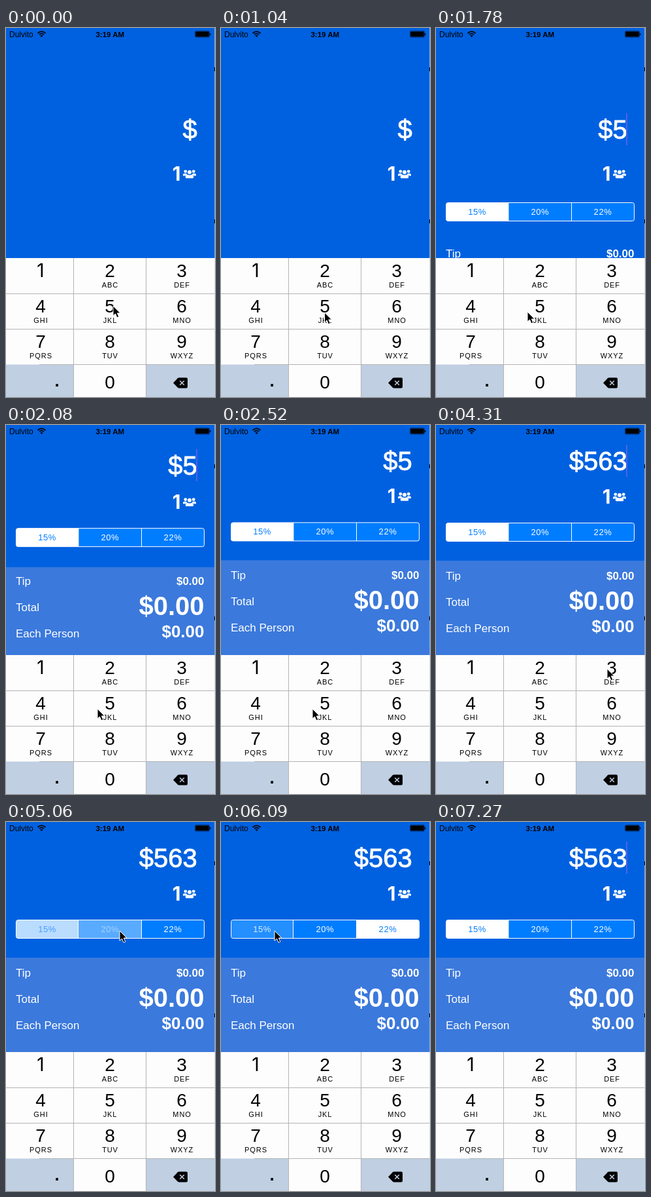
An HTML page for the animation above (7570 ms loop, 320 by 563 pixels).

```html
<!DOCTYPE html>
<html lang="en">
<head>
<meta charset="utf-8">
<title>Tip calculator</title>
<style>
  html, body { margin: 0; width: 100%; height: 100%; overflow: hidden; background: #0061e0; }
  svg { display: block; width: 100vw; height: 100vh; font-family: "Liberation Sans", Arial, sans-serif; }
  .white { fill: #fff; }
  .bold { font-weight: bold; }
  .mid { text-anchor: middle; }
  .end { text-anchor: end; }
  .one { font-family: Inter, sans-serif; }
</style>
</head>
<body>
<svg id="stage" viewBox="0 0 320 563" preserveAspectRatio="none"></svg>
<script>
const LOOP = 7570, TICKS = 51, TICK = LOOP / TICKS;
const NS = 'http://www.w3.org/2000/svg';
const stage = document.getElementById('stage');

function add(parent, tag, attrs = {}, text) {
  const el = document.createElementNS(NS, tag);
  for (const key in attrs) el.setAttribute(key, attrs[key]);
  if (text !== undefined) el.textContent = text;
  return parent.appendChild(el);
}
const rect = (parent, x, y, width, height, fill, more) =>
  add(parent, 'rect', { x, y, width, height, fill, ...more });
const label = (parent, x, y, size, text, cls = '', more) =>
  add(parent, 'text', { x, y, 'font-size': size, class: cls, ...more }, text);
const path = (parent, d, more) => add(parent, 'path', { d, ...more });

// Background and sliding panel
rect(stage, 0, 0, 320, 563, '#0061e0');
const panel = rect(stage, 0, 207, 319, 360, '#3b79dc');

// Bill amount with caret
const bill = add(stage, 'g');
const amount = label(bill, 292.8, 69, 40, '$', 'white end', { stroke: '#fff', 'stroke-width': 0.9 });
const caret = rect(bill, 291, 30, 2, 49, '#4f63ea');

// Number of people
const people = add(stage, 'g');
label(people, 267.5, 120, 29.5, '1', 'white end one', { 'font-weight': 700 });
const crowd = add(people, 'g', { class: 'white' });
for (const [x, y, r] of [[274.8, 105.8, 2.4], [287.2, 105.8, 2.4], [281, 107, 3]])
  add(crowd, 'circle', { cx: x, cy: y, r });
path(crowd, 'M271 112.5v-1.5q0-2 2-2h3.2q.6 1 1.200 1.600q-1.800.5-2.400 1.900z');
path(crowd, 'M291 112.5v-1.5q0-2-2-2h-3.2q-.6 1-1.200 1.600q1.800.5 2.400 1.900z');
path(crowd, 'M274.800 114.700q0-3.900 3.200-3.900q3 1.500 6 0q3.200 0 3.200 3.900q0 1.500-1.600 1.500h-9.200q-1.600 0-1.600-1.500z');

// Tip percentages
const picker = add(stage, 'g');
const segments = ['15%', '20%', '22%'].map((text, i) => {
  const x = 15.5 + i * 96.2, right = x + 96.1;
  const d = i === 0 ? `M${right} 149.5H18.5q-3 0-3 3v22q0 3 3 3H${right}z`
    : i === 2 ? `M${x} 149.5H300.5q3 0 3 3v22q0 3-3 3H${x}z`
    : `M${x} 149.5H${right}v28H${x}z`;
  return {
    box: path(picker, d),
    text: label(picker, x + 47.6, 168, 13, text, 'mid', { 'letter-spacing': 0.6 })
  };
});
rect(picker, 15.5, 149.5, 288, 28, 'none', { rx: 3, stroke: '#fff' });
path(picker, 'M110.5 149.5v28M207.5 149.5v28', { stroke: '#fff' });

// Results
const results = add(stage, 'g');
[['Tip', 236, 17, 236], ['Total', 276, 40, 282], ['Each Person', 316, 26, 316]]
  .forEach(([name, y, size, base]) => {
    label(results, 15, y, 17, name, 'white');
    label(results, 303.5, base, size, '$0.00', 'white bold end');
  });

// Keypad
const TINT = '#c0cfe2', LINE = '#b4b4b7';
rect(stage, 0, 351, 320, 212, '#fdfdfd');
const pressedKey = rect(stage, 215, 351, 104, 54, TINT);
rect(stage, 0, 513.5, 103.5, 50, TINT);
rect(stage, 214.5, 513.5, 105.5, 50, TINT);
path(stage, 'M0 405.5H320M0 459.5H320M51 513.5H320M103.5 351V563M214.5 351V563', { stroke: LINE });
const columns = [53, 159, 269];
['', 'ABC', 'DEF', 'GHI', 'JKL', 'MNO', 'PQRS', 'TUV', 'WXYZ'].forEach((letters, i) => {
  const x = columns[i % 3], y = 380.3 + Math.floor(i / 3) * 54;
  label(stage, x, y, 28, i + 1, i ? 'mid' : 'mid one');
  label(stage, x + 0.5, y + 15.7, 11, letters, 'mid', { 'letter-spacing': 0.9 });
});
label(stage, 159, 550.3, 28, '0', 'mid');
label(stage, 78, 547, 26, '.', 'mid bold');
path(stage, 'M256 541.5l7-7.2q.8-.8 2-.8h11q2 0 2 2v12q0 2-2 2h-11q-1.200 0-2-.8z');
path(stage, 'M266.2 538.2l6.6 6.6m0-6.6l-6.6 6.6', { stroke: TINT, 'stroke-width': 1.5 });

// Status bar
label(stage, 5, 13.5, 12, 'Dulvito');
label(stage, 159.3, 13.5, 11.5, '3:19 AM', 'mid bold');
for (const [r, y] of [[6, 8], [3.6, 10.2]])
  path(stage, `M${54.5 - r} ${y}q${r}-${r * 0.85} ${r * 2} 0`, { fill: 'none', stroke: '#000', 'stroke-width': 1.7 });
path(stage, 'M52.3 11.8q2.200-1.600 4.400 0l-2.200 2.200z');
rect(stage, 289.6, 4.8, 21.8, 9.2, 'none', { rx: 1.5, stroke: '#000', 'stroke-width': 0.6 });
rect(stage, 290.3, 5.5, 20.4, 7.8, '#000', { rx: 0.8 });
rect(stage, 311.9, 8, 1.3, 3, '#000', { rx: 0.6 });

// Sliver of the desktop at the right edge
rect(stage, 319, 0, 1, 563, '#c9dcf4', { opacity: 0.6 });
for (const y of [60, 292]) rect(stage, 319, y, 1, 6, '#000');

// Mouse pointer with its tip at the origin
const pointer = path(stage, 'M0 0V15.2L3.5 12L6 17.8L8.8 16.6L6.3 11H11z',
  { stroke: '#fff', 'stroke-width': 1, 'stroke-linejoin': 'round' });

// Tick, x, y
const route = [
  [0, 164, 424], [6, 164, 424], [8, 153, 444], [10, 140, 433], [17, 140, 433],
  [19, 171, 432], [23, 246, 430], [26, 246, 430], [28, 262, 372], [29, 262, 372],
  [32, 176, 172], [33, 174, 166], [34, 174, 166], [36, 250, 168], [39, 250, 168],
  [41, 82, 166], [42, 82, 166], [44, 212, 416], [45, 212, 416], [49, 226, 570], [51, 226, 570]
];
const caretShown = [[3, 5], [9, 14], [19, 25], [27, 31], [35, 38], [42, 45], [49, 50]];

function pointerAt(n) {
  const i = Math.max(1, route.findIndex(stop => stop[0] >= n));
  const [n0, x0, y0] = route[i - 1], [n1, x1, y1] = route[i];
  const k = (n - n0) / (n1 - n0);
  return [x0 + (x1 - x0) * k, y0 + (y1 - y0) * k];
}

// Selected weight of each tip segment
function selection(n) {
  if (n < 34) return [1, 0, 0];
  if (n === 34) return [0.73, 0.35, 0];
  if (n < 38) return [0, 1, 0];
  if (n === 38) return [0, 0.73, 0.35];
  if (n < 41) return [0, 0, 1];
  if (n === 41) return [0.14, 0, 1];
  return [1, 0, 0];
}

// White at weight 1, blue at weight 0
const blend = w => `rgb(${Math.round(255 * w)},${Math.round(125 + 130 * w)},255)`;

function spring(s) {
  if (s <= 0) return 0;
  const rate = 6.7;
  return 1 - Math.exp(-rate * s) * (Math.cos(rate * s) + Math.sin(rate * s));
}

const show = (el, on) => el.setAttribute('visibility', on ? 'visible' : 'hidden');
const shift = (el, y) => el.setAttribute('transform', `translate(0 ${y})`);

function render(ms) {
  const n = Math.min(TICKS - 1, Math.floor((ms % LOOP + 5) / TICK));
  const rest = 1 - spring((n - 12) * TICK / 1000);

  shift(bill, 100 * rest);
  shift(people, 113 * rest);
  shift(picker, 117 * rest);
  shift(results, 114 * rest);
  shift(panel, 144 * rest);
  [picker, results, panel].forEach(el => show(el, n >= 12));

  amount.textContent = '$' + '563'.slice(0, [9, 23, 29].filter(at => n >= at).length);
  show(caret, caretShown.some(([from, to]) => n >= from && n <= to));
  show(pressedKey, n === 28);

  selection(n).forEach((w, i) => {
    segments[i].box.setAttribute('fill', blend(w));
    segments[i].text.setAttribute('fill', blend(1 - w));
  });
  pointer.setAttribute('transform', `translate(${pointerAt(n)})`);
}

const start = performance.now();
function loop() {
  render(performance.now() - start);
  requestAnimationFrame(loop);
}
loop();
</script>
</body>
</html>
```
